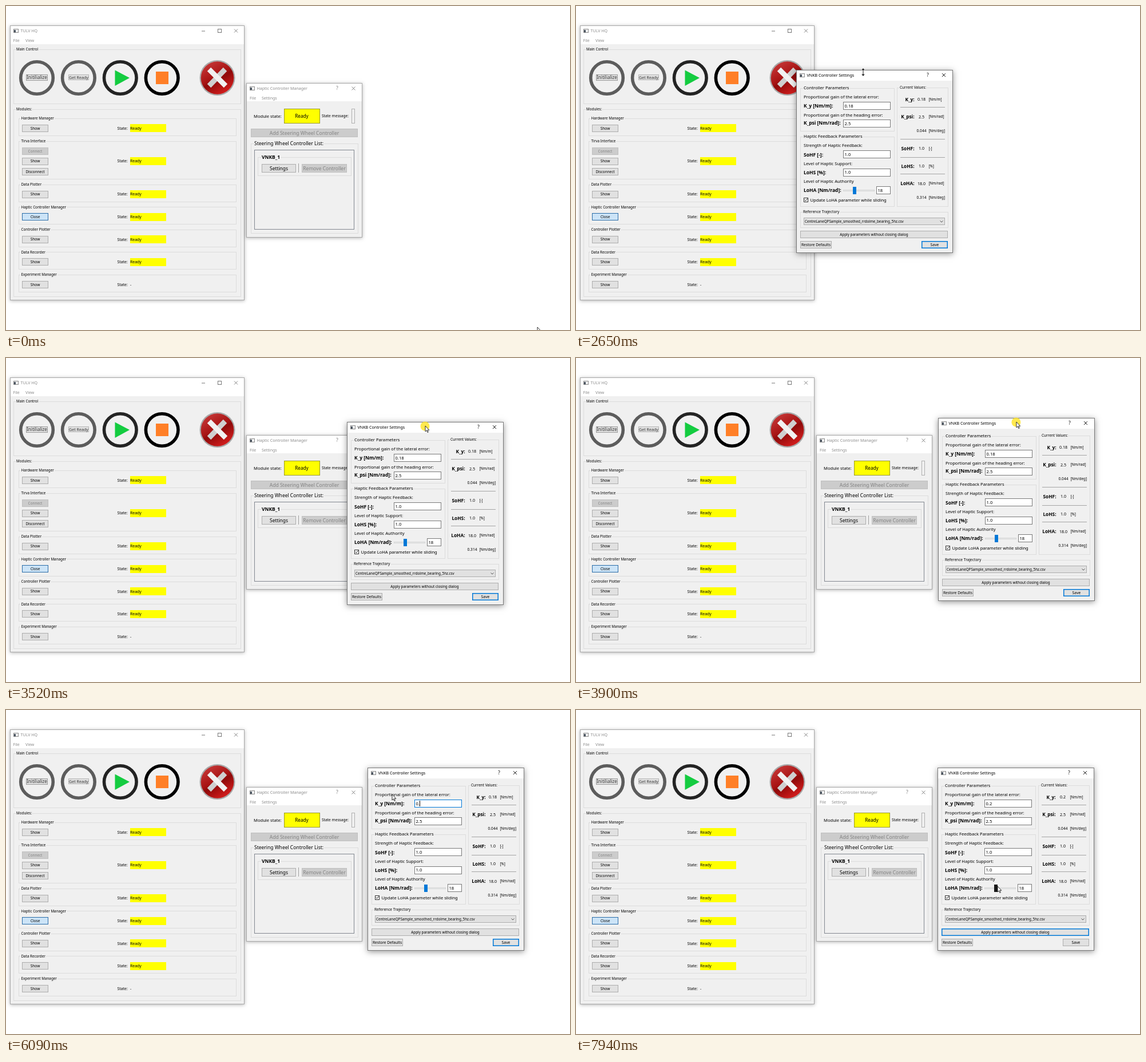
An HTML page with a canvas that plays this animation: 986x568 px, repeating every 8000 ms.

```html
<!DOCTYPE html>
<html lang="en">
<head>
<meta charset="utf-8">
<title>Controller settings</title>
<style>
  html, body { margin: 0; width: 100%; height: 100%; overflow: hidden; background: #fff; }
  canvas { display: block; }
</style>
</head>
<body>
<canvas id="stage" width="986" height="568"></canvas>
<script>
const ctx = document.getElementById('stage').getContext('2d');
const LOOP = 8000, TICK = 77.9;
const UI = '"Noto Sans", "Open Sans", sans-serif';
const BLUE = '#0078d7', FACE = '#f0f0f0', GRAY = '#8c8c8c';

// Pointer keyframes: time, x, y
const POINTER = [
  [0, 929, 563], [60, 929, 563], [690, 480, 284], [920, 480, 284], [1240, 487, 190],
  [1710, 502, 112], [1780, 502, 112], [2150, 733, 114], [2570, 502, 116], [2650, 502, 116],
  [2890, 568, 128], [3130, 522, 119], [3200, 522, 119], [3520, 736, 119], [3900, 770, 112],
  [4060, 770, 112], [4300, 769, 108], [4840, 737, 163], [4920, 737, 163], [5300, 675, 148],
  [6400, 675, 148], [6950, 742, 388], [7250, 742, 388], [7860, 737, 309]
];
const PRESSES = [[910, 1010], [1760, 2600], [3250, 4320], [4900, 5340], [7080, 7240]];

const between = (t, a, b) => t >= a && t < b;
const clamp = v => Math.max(0, Math.min(1, v));

function pointerAt(t) {
  const i = POINTER.findIndex(k => k[0] > t);
  if (i < 0) return POINTER[POINTER.length - 1].slice(1);
  const [t0, x0, y0] = POINTER[i - 1], [t1, x1, y1] = POINTER[i];
  const u = (t - t0) / (t1 - t0), e = u * u * (3 - 2 * u);
  return [x0 + (x1 - x0) * e, y0 + (y1 - y0) * e];
}

function text(str, x, mid, size, color = '#000', align = 'left', weight = 400) {
  ctx.font = `${weight} ${size}px ${UI}`;
  ctx.textAlign = align;
  ctx.fillStyle = color;
  ctx.fillText(str, x, mid + size * 0.36);
}
const bold = (str, x, mid, size = 8.5, align) => text(str, x, mid, size, '#000', align, 700);

function rect(x, y, w, h, fill) {
  ctx.fillStyle = fill;
  ctx.fillRect(x, y, w, h);
}

function box(x, y, w, h, fill, border, line = 1) {
  x = Math.round(x); y = Math.round(y); w = Math.round(w); h = Math.round(h);
  rect(x, y, w, h, border);
  rect(x + line, y + line, w - 2 * line, h - 2 * line, fill);
}

function poly(points, fill, stroke, width = 1, close = !!fill) {
  ctx.beginPath();
  points.forEach(p => ctx.lineTo(...p));
  if (close) ctx.closePath();
  if (fill) { ctx.fillStyle = fill; ctx.fill(); }
  if (stroke) { ctx.strokeStyle = stroke; ctx.lineWidth = width; ctx.stroke(); }
}

function disc(x, y, r, fill) {
  ctx.beginPath();
  ctx.arc(x, y, r, 0, 7);
  ctx.fillStyle = fill;
  ctx.fill();
}

const BUTTON = {
  normal: ['#e1e1e1', '#adadad', '#000'],
  disabled: ['#cccccc', '#bfbfbf', '#838383'],
  hover: ['#e5f1fb', BLUE, '#000'],
  active: ['#cce4f7', '#2a6ca8', '#000'],
  primary: ['#e1e1e1', BLUE, '#000']
};
function button(label, x, y, w, h, size, kind = 'normal') {
  const [fill, border, color] = BUTTON[kind];
  box(x, y, w, h, fill, border, kind === 'primary' ? 1.5 : 1);
  text(label, x + w / 2, y + h / 2, size, color, 'center');
}

function group(label, x, y, w, h, size, weight = 400, indent = 5) {
  ctx.strokeStyle = '#dcdcdc';
  ctx.lineWidth = 1;
  ctx.strokeRect(Math.round(x) + 0.5, Math.round(y) + 0.5, Math.round(w), Math.round(h));
  ctx.font = `${weight} ${size}px ${UI}`;
  rect(x + indent - 1, y - 4, ctx.measureText(label).width + 2, 8, FACE);
  text(label, x + indent, y, size, '#000', 'left', weight);
}

function cross(x, y, color) {
  poly([[x - 3, y - 3], [x + 3, y + 3]], null, color, 0.9);
  poly([[x - 3, y + 3], [x + 3, y - 3]], null, color, 0.9);
}

// Window frame with shadow, white header, icon and title
function frame(title, x, y, w, h, header, active) {
  ctx.save();
  ctx.shadowColor = active ? 'rgba(0,0,0,.42)' : 'rgba(0,0,0,.3)';
  ctx.shadowBlur = active ? 10 : 6;
  ctx.shadowOffsetY = active ? 2 : 1;
  rect(x, y, w, h, '#999');
  ctx.restore();
  box(x, y, w, h, FACE, active ? '#777' : '#a8a8a8');
  rect(x + 1, y + 1, w - 2, header - 1, '#fff');
  const ix = x + 6, iy = y + 6;
  box(ix, iy, 9, 7, '#f4f4f4', '#8a8a8a');
  rect(ix + 1, iy + 2, 3, 4, '#4c5662');
  text(title, x + 18.5, y + 9.7, 7.1, active ? '#000' : GRAY);
}

function mainWindow() {
  frame('TULV HQ', 7, 34, 410, 482, 33, false);
  rect(342, 43.5, 6, 1, '#777');
  ctx.strokeStyle = '#777';
  ctx.lineWidth = 1;
  ctx.strokeRect(370.5, 40.5, 6, 6);
  cross(402, 43.5, '#777');
  text('File', 12.5, 60, 7, GRAY);
  text('View', 34, 60, 7, GRAY);

  group('Main Control', 13, 76, 397, 95, 6.3);
  ['#5c5c5c', '#5c5c5c', '#232323', '#000'].forEach((color, i) => {
    ctx.beginPath();
    ctx.arc(54 + i * 72.9, 126, 28.3, 0, 7);
    ctx.strokeStyle = color;
    ctx.lineWidth = 5.6;
    ctx.stroke();
  });
  box(35, 120, 38, 11, '#e1e1e1', '#9a9a9a');
  text('Initilialize', 54, 125.5, 8, '#333', 'center');
  box(109, 120, 36, 10, '#e1e1e1', '#b5b5b5');
  text('Get Ready', 127, 125, 7.1, '#333', 'center');
  poly([[190.5, 112.5], [190.5, 140], [216, 126]], '#14cc40');
  rect(262, 115, 22, 22, '#ff7f27');

  disc(369.5, 126, 31, '#a9a9a9');
  const red = ctx.createLinearGradient(350, 98, 385, 155);
  red.addColorStop(0, '#c83a3a');
  red.addColorStop(0.45, '#a81414');
  red.addColorStop(0.55, '#8f0a0a');
  red.addColorStop(1, '#dc2020');
  disc(369.5, 126, 28.8, red);
  poly([[383, 111], [355, 140]], null, '#cfcfcf', 9);
  poly([[355, 111], [384, 140]], null, '#f1f1f1', 9);

  group('Modules:', 13, 181, 397, 328, 6.3);
  const row = (label, y, last) => {
    const tall = label.startsWith('Tirva'), mid = y + (tall ? 35 : 17.3);
    group(label, 22, y, 380, tall ? 66 : 30, 6.3, 400, 4.5);
    if (tall) {
      button('Connect', 28, mid - 24, 46, 13, 6.4, 'disabled');
      button('Disconnect', 28, mid + 12, 46, 13, 6.4);
    }
    const open = label.startsWith('Haptic');
    button(open ? 'Close' : 'Show', 28, mid - 6.5, 46, 13, 6.6, open ? 'active' : 'normal');
    text('State:', 194.5, mid, 6.9);
    if (!last) rect(217, Math.round(mid - 7), 63, 14, '#ff0');
    text(last ? '-' : 'Ready', 217, mid, 6.9);
  };
  row('Hardware Manager', 197);
  row('Tirva Interface', 237);
  ['Data Plotter', 'Haptic Controller Manager', 'Controller Plotter', 'Data Recorder', 'Experiment Manager']
    .forEach((label, i) => row(label, 312.7 + i * 39.55, i === 4));
}

function managerWindow(t) {
  frame('Haptic Controller Manager', 420, 135, 203, 271, 32, false);
  text('?', 579, 144.5, 8, '#777', 'center');
  cross(607.5, 144.5, '#777');
  text('File', 426, 161, 7, GRAY);
  text('Settings', 447, 161, 7, GRAY);
  text('Module state:', 433, 193, 7.6);
  box(486, 180, 63, 26, '#ff0', '#9b9b20');
  text('Ready', 517, 193, 8.2, '#000', 'center');
  text('State message:', 552, 193, 6.6);
  box(604, 180, 6, 26, FACE, '#b0b0b0');
  button('Add Steering Wheel Controller', 428, 215, 187, 15, 8.55, 'disabled');
  group('Steering Wheel Controller List:', 428, 241, 187, 157, 8.5, 400, 6);
  box(434, 252, 175, 140, FACE, '#828790');
  group('VNKB_1', 440, 265, 163, 32, 8.5, 700, 7);
  const over = between(t, 620, 1000);
  button('Settings', 447, 277, 60, 15, 8.4, over ? 'hover' : 'normal');
  rect(511, 276, 1, 16, '#a0a0a0');
  button('Remove Controller', 517, 277, 79, 15, 8.5, 'disabled');
}

function field(value, x, y, w, focused) {
  box(x, y, w, 14, '#fff', focused ? BLUE : '#7a7a7a');
  text(value, x + 2.5, y + 7, 7.6);
}

function gainField(t, y) {
  const typed = t < 5610 ? '0.18' : t < 5920 ? '0' : t < 6080 ? '0.' : '0.2';
  const focused = between(t, 4910, 7080);
  field(typed, 467, y, 83, focused);
  if (between(t, 5060, 5610)) {
    rect(469, Math.round(y) + 2, 16, 10, BLUE);
    text(typed, 469.5, y + 7, 7.6, '#fff');
  } else if (focused) {
    ctx.font = `400 7.6px ${UI}`;
    rect(Math.round(470 + ctx.measureText(typed).width), Math.round(y) + 2, 1, 10, '#000');
  }
}

// Dialog in its opening position; s moves the top edge down
function dialog(t, s) {
  const applied = t >= 7080;
  frame('VNKB Controller Settings', 385, Math.round(108 + s), 274, Math.round(325 - s), 19, true);
  text('?', 615, 117.5 + s, 8, '#000', 'center');
  cross(643, 117.5 + s, '#000');

  group('Controller Parameters', 392, 140 + s, 164, 75, 7.65, 400, 6);
  text('Proportional gain of the lateral error:', 398, 156 + s, 7.6);
  bold('K_y [Nm/m]:', 398, 171.5 + s);
  gainField(t, 164.4 + s);
  text('Proportional gain of the heading error:', 398, 187.5 + s, 7.6);
  bold('K_psi [Nm/rad]:', 398, 201.5 + s);
  field('2.5', 467, 195.6 + s, 83);

  group('Haptic Feedback Parameters', 392, 225 + s, 164, 126 - s, 7.65, 400, 6);
  text('Strength of Haptic Feedback:', 398, 241 + s, 7.6);
  bold('SoHF [-]:', 398, 257 + s);
  field('1.0', 467, 249.6 + s, 83);
  text('Level of Haptic Support:', 398, 272.5 + s, 7.6);
  bold('LoHS [%]:', 398, 288 + s);
  field('1.0', 467, 281 + s, 83);
  text('Level of Haptic Authority', 398, 304 + s, 7.6);
  bold('LoHA [Nm/rad]:', 398, 319.5 + s);
  box(467, 318 + s, 55, 3, '#e7eaea', '#d6d6d6');
  rect(484, Math.round(313 + s), 6, 13, t >= 7830 ? '#171717' : BLUE);
  field('18', 525, 312.5 + s, 25);
  box(398, 332 + s, 8, 8, '#fff', '#333');
  poly([[399.7, 336 + s], [401.5, 338 + s], [404.6, 334 + s]], null, '#000', 0.9);
  text('Update LoHA parameter while sliding', 409.5, 336.5 + s, 7.6);

  // The value column closes up evenly towards its bottom
  const at = y => y + s * clamp((338 - y) / 176);
  group('Current Values:', 561, 139 + s, 89, 212 - s, 6.4);
  const value = (name, num, unit, y) => {
    bold(name, 591.5, at(y), 8.3, 'right');
    text(num, 604, at(y), name ? 7.1 : 6.6, '#000', 'center');
    text(unit, 616.5, at(y), 6.3);
  };
  value('K_y:', t >= 7150 ? '0.2' : '0.18', '[Nm/m]', 160);
  value('K_psi:', '2.5', '[Nm/rad]', 191);
  value('', '0.044', '[Nm/deg]', 216.5);
  value('SoHF:', '1.0', '[-]', 248);
  value('LoHS:', '1.0', '[%]', 279.5);
  value('LoHA:', '18.0', '[Nm/rad]', 310.5);
  value('', '0.314', '[Nm/deg]', 336);
  [174, 231, 263, 293.5].forEach(y => rect(567, Math.round(at(y)), 78, 1, '#a5a5a5'));

  group('Reference Trajectory', 392, 361, 258, 27, 6.6);
  box(398, 371, 247, 13, '#e1e1e1', '#adadad');
  text('CentreLaneQPSample_smoothed_rrdolme_bearing_5hz.csv', 400, 377.7, 6.25);
  poly([[636.5, 376.5], [639, 379], [641.5, 376.5]], null, '#444', 0.9);
  const over = between(t, 6880, 7420);
  button('Apply parameters without closing dialog', 392, 394, 258, 13, 6.3,
    over ? 'hover' : applied ? 'primary' : 'normal');
  button('Restore Defaults', 392, 412, 55, 13, 6.6);
  button('Save', 604, 412, 46, 13, 6.8, applied ? 'normal' : 'primary');
}

function pointer(t, x, y) {
  if (PRESSES.some(([a, b]) => between(t, a, b))) disc(x - 0.5, y + 0.5, 8, 'rgba(255,225,20,.75)');
  ctx.save();
  ctx.translate(x, y);
  if (between(t, 1700, 2700)) {
    poly([[0, -7], [3, -3.5], [0.7, -3.5], [0.7, 3.5], [3, 3.5], [0, 7],
      [-3, 3.5], [-0.7, 3.5], [-0.7, -3.5], [-3, -3.5]], '#111', '#fff', 0.4);
  } else if (between(t, 4760, 5340)) {
    poly([[-2, -5], [2, -5]], null, '#000', 0.8);
    poly([[0, -5], [0, 5]], null, '#000', 0.8);
    poly([[-2, 5], [2, 5]], null, '#000', 0.8);
  } else {
    poly([[0, 0], [0, 10], [2.3, 7.9], [3.9, 11.5], [5.4, 10.8], [3.8, 7.3], [6.8, 7.3]], '#fff', '#000', 0.8);
  }
  ctx.restore();
}

function draw(now) {
  const time = now % LOOP;
  const t = Math.max(0, Math.floor((time - 67) / TICK) * TICK + 70);
  const [x, y] = pointerAt(t);
  rect(0, 0, 986, 568, '#fff');
  mainWindow();
  managerWindow(t);
  if (t >= 910) {
    const s = 3.6 * clamp((t - 1780) / 790);
    const [gx, gy] = pointerAt(Math.max(3200, Math.min(t, 4300)));
    ctx.save();
    ctx.globalAlpha = clamp((t - 860) / 220);
    ctx.translate(Math.round(gx - 522), Math.round(gy - 119));
    dialog(t, s);
    ctx.restore();
  }
  pointer(t, x, y);
  requestAnimationFrame(draw);
}
requestAnimationFrame(draw);
</script>
</body>
</html>
```
